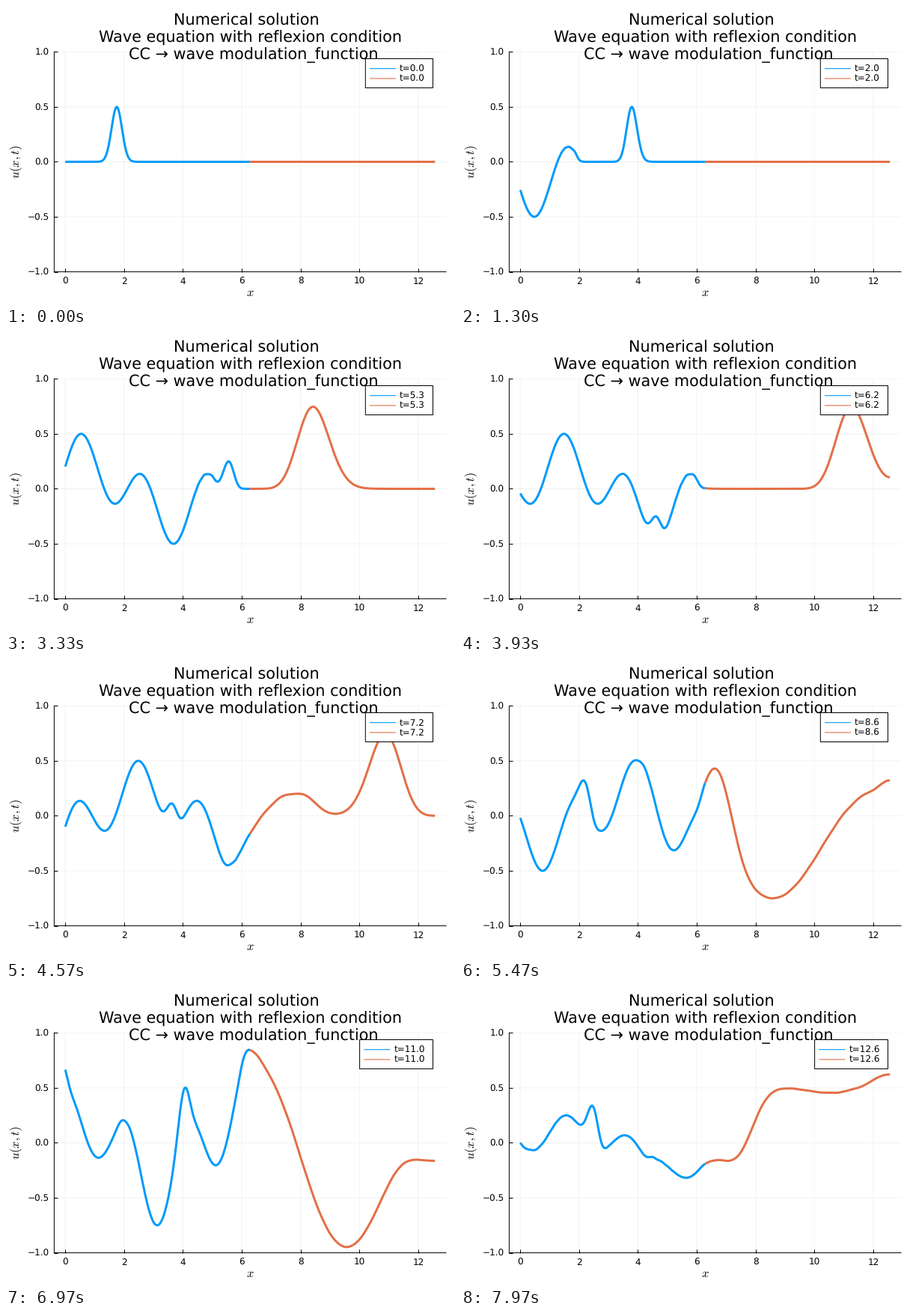
These frames come from a looping animation (600x400 px, 8000 ms). A matplotlib script:

```python
import numpy as np
import matplotlib.pyplot as plt
from matplotlib.animation import FuncAnimation
from matplotlib.patches import Rectangle

W, H, DPI = 600, 400, 100
PX = 72 / DPI                      # one pixel in points
TICK_MS, TICKS = 20, 400           # three simulation steps per five ticks
STEPS = 240
DT = 0.05252                       # simulated time per step
SUB = 5                            # solver iterations per step
L = 2 * np.pi                      # length of each medium
CELLS = 390
BLUE, ORANGE = "#009afa", "#e36f47"

plt.rcParams.update({
    "font.family": "DejaVu Sans",
    "mathtext.fontset": "cm",
    "path.snap": False,
    "text.hinting": "none",
})


def pulse(s):
    return 0.5 * np.exp(-((s - 1.75) / 0.25) ** 2)


def source(t):
    return 0.5 * np.sin(t) * np.cos(2 * t) if t > 0 else 0.0


def solve():
    """Leapfrog scheme: open source end on the left, free end on the right."""
    x = np.linspace(0, 2 * L, CELLS + 1)
    dx, dt = x[1], DT / SUB
    mid = CELLS // 2
    courant = np.where(np.arange(CELLS + 1) < mid, 1.0, 3.0) * dt / dx
    c2 = courant ** 2
    mur = (courant[0] - 1) / (courant[0] + 1)

    old, u = pulse(x + dt), pulse(x)
    history = [u]
    for n in range((STEPS - 1) * SUB):
        t, t1 = n * dt, (n + 1) * dt
        new = np.empty_like(u)
        new[1:-1] = (2 * u[1:-1] - old[1:-1]
                     + c2[1:-1] * (u[2:] - 2 * u[1:-1] + u[:-2]))
        new[-1] = 2 * u[-1] - old[-1] + 2 * c2[-1] * (u[-2] - u[-1])
        # the left-going part passes through x = 0
        out0 = u[0] - source(t)
        out1 = u[1] - source(t - dx)
        out1_new = new[1] - source(t1 - dx)
        new[0] = source(t1) + out1 + mur * (out1_new - out0)
        old, u = u, new
        if (n + 1) % SUB == 0:
            history.append(u)
    return x, mid, history


x, mid, history = solve()

fig = plt.figure(figsize=(W / DPI, H / DPI), dpi=DPI, facecolor="white")

# plot area
x0, x1, top, bottom = 64.4, 588, 61.3, 355.6
ax = fig.add_axes([x0 / W, 1 - bottom / H, (x1 - x0) / W, (bottom - top) / H])
ax.set_xlim(-0.06 * L, 2.06 * L)
ax.set_ylim(-1, 1)
ax.set_xticks(range(0, 13, 2))
ax.set_yticks(np.arange(-1, 1.1, 0.5))
ax.yaxis.set_major_formatter("{x:.1f}")
ax.tick_params(direction="in", length=5 * PX, width=PX, pad=7 * PX,
               labelsize=12 * PX)
ax.grid(color="black", alpha=0.05, linewidth=PX)
ax.set_axisbelow(True)
ax.spines[["top", "right"]].set_visible(False)
ax.spines[["left", "bottom"]].set_linewidth(PX)

left, right = slice(0, mid + 1), slice(mid, None)
style = dict(lw=3 * PX, solid_capstyle="butt", solid_joinstyle="round")
curves = [(part, ax.plot(x[part], history[0][part], color=color, **style)[0])
          for part, color in [(left, BLUE), (right, ORANGE)]]

# overlay in pixel coordinates for titles and legend
over = fig.add_axes([0, 0, 1, 1], zorder=2)
over.set_xlim(0, W)
over.set_ylim(H, 0)
over.axis("off")


def label(x, y, text, size, **kw):
    return over.text(x, y, text, fontsize=size * PX, color="black", **kw)


for tx, ty, text in [
    (223.7, 26, "Numerical solution"),
    (123.5, 49, "Wave equation with reflexion condition"),
    (163.5, 71.3, "CC → wave modulation_function"),
]:
    label(tx, ty, text, 20.8, va="baseline", zorder=3)
label(326, 383, "$x$", 16.5, ha="center", va="center")
label(13.5, 208.5, "$u(x,t)$", 16.5, ha="center", va="center", rotation=90)

BOX_RIGHT = 570.5
box = over.add_patch(Rectangle((480.3, 70.5), 90, 39, fc="white", ec="black",
                               lw=PX, zorder=4))
rows = []
for y, color in [(83.7, BLUE), (97, ORANGE)]:
    key, = over.plot([0, 0], [y, y], color=color, lw=1.1 * PX,
                     solid_capstyle="butt", zorder=5)
    rows.append((key, label(0, y + 4.3, "", 12, va="baseline", zorder=5)))


def draw(tick):
    step = (3 * tick + 2) // 5
    for part, line in curves:
        line.set_ydata(history[step][part])

    text = f"t={step * DT:.1f}"
    edge = 480.3 if len(text) == 5 else 472.6
    box.set_x(edge)
    box.set_width(BOX_RIGHT - edge)
    for key, caption in rows:
        key.set_xdata([edge + 5.7, edge + 40.7])
        caption.set_x(edge + 45.7)
        caption.set_text(text)
    return [line for _, line in curves] + [box]


anim = FuncAnimation(fig, draw, frames=TICKS, interval=TICK_MS,
                     repeat=True, repeat_delay=0, blit=False)
plt.show()
```
